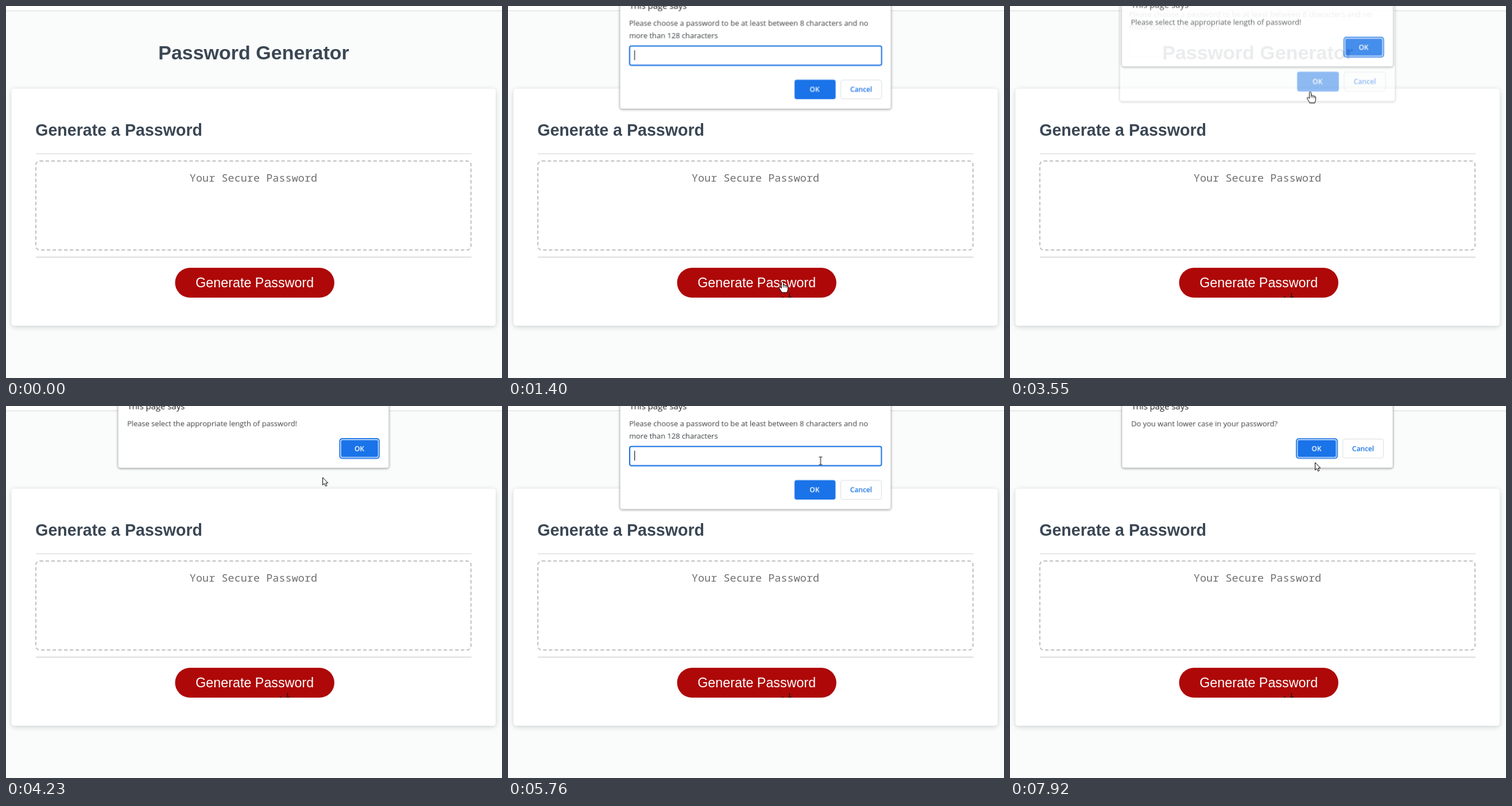
Animation, 864 px wide and 648 px high, one loop 8 s. Source, as an HTML page:

```html
<!DOCTYPE html>
<html lang="en">
<head>
<meta charset="utf-8">
<title>Password Generator</title>
<style>
html, body { margin: 0; width: 100%; height: 100%; overflow: hidden; background: #fafcfb; }
svg, .area { position: absolute; box-sizing: border-box; }
svg { left: 0; top: 0; width: 864px; height: 648px; }
.area { left: 51px; top: 269px; width: 760px; height: 157px; border: 2px dashed #c0c0c0; border-radius: 8px; }

.page { font-family: "Liberation Sans", Arial, sans-serif; }
.dark { fill: #3b4754; font-weight: bold; }
.mid { text-anchor: middle; }
.mono { font: 18.55px "Noto Sans Mono", monospace; fill: #707070; }
.card { fill: #fff; filter: drop-shadow(0 2px 4px rgba(60, 72, 84, .24)); }

.dialog { font: 12.92px "Open Sans", sans-serif; fill: #3c4043; transform-origin: 431px 31px; }
.panel { fill: #fff; stroke: rgba(0, 0, 0, .16); filter: drop-shadow(0 1.5px 2px rgba(0, 0, 0, .36)); }
.title { font-size: 14.9px; fill: #202124; }
.label { font-size: 12px; font-weight: 600; text-anchor: middle; }
.blue { fill: #1a73e8; }
.white { fill: #fff; }
.field { fill: none; stroke: #dadce0; }
.ring { fill: none; stroke: #1a73e8; stroke-width: 2; }
.gap { fill: none; stroke: #fff; stroke-width: 1.2; }
.shape { fill: #fff; stroke: #000; stroke-width: 1; stroke-linejoin: round; }

/* every animation shares the 8 s loop: 1% = 80 ms */
.dialog, .cursor, .cursor g, .caret, .fade, .key, .trace { animation: 8s linear infinite; }
.caret, .cursor g, .key, .trace { animation-timing-function: step-end; }
:root {
  --away: translateY(-17.5px) scale(1.0175);
  --home: translateY(0) scale(1);
  --enter: cubic-bezier(.33, .38, .7, .95);
  --leave: cubic-bezier(.33, .56, .68, 1);
}

#ask1 { animation-name: ask1; }
@keyframes ask1 {
  0%, 15.875% { opacity: 0; }
  17.44%, 43.19% { opacity: 1; }
  45.5%, 100% { opacity: 0; }
  0%, 15.875% { transform: var(--away); animation-timing-function: var(--enter); }
  18.125% { transform: var(--home); }
  42.875% { transform: var(--home); animation-timing-function: var(--leave); }
  45.125%, 100% { transform: var(--away); }
}
#warn { animation-name: warn; }
@keyframes warn {
  0%, 43.125% { opacity: 0; }
  44.69%, 58.94% { opacity: 1; }
  61.25%, 100% { opacity: 0; }
  0%, 43.125% { transform: var(--away); animation-timing-function: var(--enter); }
  45.375% { transform: var(--home); }
  58.625% { transform: var(--home); animation-timing-function: var(--leave); }
  60.875%, 100% { transform: var(--away); }
}
#ask2 { animation-name: ask2; }
@keyframes ask2 {
  0%, 58.875% { opacity: 0; }
  60.44%, 89.75% { opacity: 1; }
  92%, 100% { opacity: 0; }
  0%, 58.875% { transform: var(--away); animation-timing-function: var(--enter); }
  61.125% { transform: var(--home); }
  89.375% { transform: var(--home); animation-timing-function: var(--leave); }
  91.625%, 100% { transform: var(--away); }
}
#lower { animation-name: lower; }
@keyframes lower {
  0%, 89.625% { opacity: 0; }
  91.19%, 100% { opacity: 1; }
  0%, 89.625% { transform: var(--away); animation-timing-function: var(--enter); }
  91.875%, 100% { transform: var(--home); }
}

/* focus outlines fade once a button is pressed */
.blur1 { animation-name: blur1; }
@keyframes blur1 { 0%, 39.625% { opacity: 1; } 41%, 100% { opacity: 0; } }
.blur2 { animation-name: blur2; }
@keyframes blur2 { 0%, 56.375% { opacity: 1; } 57.75%, 100% { opacity: 0; } }
.blur3 { animation-name: blur3; }
@keyframes blur3 { 0%, 87.375% { opacity: 1; } 88.75%, 100% { opacity: 0; } }

.caret { fill: #222; }
.blink1 { animation-name: blink1; }
@keyframes blink1 {
  0%, 30% { opacity: 1; }
  23.75%, 36.25%, 100% { opacity: 0; }
}
.blink2 { animation-name: blink2; }
@keyframes blink2 {
  0% { opacity: 1; transform: none; }
  65.75% { opacity: 0; }
  72% { opacity: 1; transform: none; }
  74.625% { transform: translateX(7px); }
  76.375% { transform: translateX(14px); }
  82.625%, 100% { opacity: 0; transform: translateX(14px); }
}
.key1 { animation-name: key1; }
@keyframes key1 { 0% { opacity: 0; } 74.625%, 100% { opacity: 1; } }
.key2 { animation-name: key2; }
@keyframes key2 { 0% { opacity: 0; } 76.375%, 100% { opacity: 1; } }

.cursor { animation-name: travel; }
@keyframes travel {
  0%, 4.375% { transform: translate(806px, 648px); animation-timing-function: ease-in; }
  7.5% { transform: translate(640px, 566px); }
  10% { transform: translate(525px, 506px); }
  11.5% { transform: translate(484px, 488px); animation-timing-function: ease-out; }
  12.75% { transform: translate(470px, 468px); animation-timing-function: ease-in-out; }
  14%, 20.5% { transform: translate(478px, 480px); animation-timing-function: ease-in-out; }
  30.375% { transform: translate(533px, 142px); }
  31.625%, 39.625% { transform: translate(532px, 143px); animation-timing-function: ease-in-out; }
  43.75%, 50.625% { transform: translate(523px, 149.5px); animation-timing-function: ease-in-out; }
  56% { transform: translate(600px, 80px); }
  57.5%, 64.125% { transform: translate(599.5px, 85px); animation-timing-function: ease-in-out; }
  69.25%, 76.875% { transform: translate(544.5px, 95.5px); animation-timing-function: ease-in-out; }
  83.75% { transform: translate(531px, 163px); animation-timing-function: ease-in-out; }
  86.375%, 87.375% { transform: translate(529px, 160px); }
  89.375%, 96.875% { transform: translate(527px, 155.5px); animation-timing-function: ease-in-out; }
  99%, 100% { transform: translate(531px, 98px); }
}
.cursor .arrow { animation-name: arrow; }
@keyframes arrow {
  0%, 10%, 28.75%, 54.125%, 80.375% { opacity: 0; }
  4.375%, 22%, 50.75%, 78.5%, 97%, 100% { opacity: 1; }
}
.cursor .hand { animation-name: hand; }
@keyframes hand {
  0%, 22%, 50.75%, 58.75%, 97%, 100% { opacity: 0; }
  10%, 28.75%, 54.125%, 80.375% { opacity: 1; }
}
.cursor .beam { animation-name: beam; }
@keyframes beam {
  0%, 78.5%, 100% { opacity: 0; }
  58.75% { opacity: 1; }
}
.trace { animation-name: trace; }
@keyframes trace { 0% { opacity: 0; } 11.75%, 100% { opacity: 1; } }
</style>
</head>
<body>
<svg viewBox="0 0 864 648" class="page">
  <rect width="864" height="8" fill="#fff"/>
  <rect y="7.5" width="864" height="1.6" fill="#e1e3e3"/>
  <text class="dark mid" x="431.5" y="93" font-size="34">Password Generator</text>
  <rect class="card" x="9.5" y="144" width="843.5" height="413" rx="5"/>
  <text class="dark" x="51.2" y="226" font-size="28.6">Generate a Password</text>
  <path d="M52 257.4H811" stroke="#e2e3e4" stroke-width="1.8"/>
  <path d="M52 437.5H811" stroke="#e2e2e3" stroke-width="2.4"/>
  <text class="mono mid" x="431" y="305.5">Your Secure Password</text>
  <rect x="294.5" y="456" width="277.5" height="52" rx="26" fill="#ae0808"/>
  <text class="white mid" x="433.2" y="489.5" font-size="23.3">Generate Password</text>
</svg>
<div class="area"></div>

<svg viewBox="0 0 864 648">
  <defs>
    <g id="prompt">
      <rect class="panel" x="195" y="-60" width="472" height="240" rx="4"/>
      <text class="title" x="211.5" y="5.5">This page says</text>
      <text x="211" y="35.5">Please choose a password to be at least between 8 characters and no</text>
      <text x="211" y="56.5">more than 128 characters</text>
      <rect class="field" x="211.5" y="70.5" width="439" height="33" rx="3"/>
      <use href="#pair" y="72"/>
    </g>
    <g id="pair">
      <rect class="blue" x="499" y="57" width="71.5" height="34" rx="4"/>
      <text class="label white" x="534" y="78.4">OK</text>
      <rect class="field" x="579.5" y="57.5" width="71" height="33" rx="4"/>
      <text class="label blue" x="615" y="78.4">Cancel</text>
    </g>
    <g id="short">
      <rect class="panel" x="195" y="-60" width="472" height="168" rx="4"/>
      <text class="title" x="211.5" y="5.5">This page says</text>
    </g>
    <rect id="focus" class="ring" x="212" y="70.5" width="438.5" height="33.5" rx="3"/>
    <rect id="bar" x="220" y="78" width="1.2" height="17"/>
  </defs>

  <path class="trace" d="M490.5 500v6M488 507h6M477 507.3h3" fill="none" stroke="#2b0505" stroke-width="1.4"/>

  <g id="ask1" class="dialog">
    <use href="#prompt"/>
    <use href="#focus" class="fade blur1"/>
    <use href="#bar" class="caret blink1"/>
  </g>

  <g id="warn" class="dialog">
    <use href="#short"/>
    <text x="211" y="35.5">Please select the appropriate length of password!</text>
    <rect class="blue" x="581.5" y="57" width="68.5" height="34" rx="4"/>
    <g class="fade blur2">
      <rect class="ring" x="581.5" y="57" width="68.5" height="34" rx="4"/>
      <rect class="gap" x="583" y="58.5" width="65.5" height="31" rx="3"/>
    </g>
    <text class="label white" x="615.5" y="78.4">OK</text>
  </g>

  <g id="ask2" class="dialog">
    <use href="#prompt"/>
    <use href="#focus" class="fade blur3"/>
    <text class="key key1" x="219.3" y="91.5">2</text>
    <text class="key key2" x="226.4" y="91.5">2</text>
    <use href="#bar" class="caret blink2"/>
  </g>

  <g id="lower" class="dialog">
    <use href="#short"/>
    <text x="211" y="35.5">Do you want lower case in your password?</text>
    <use href="#pair"/>
    <rect class="ring" x="499" y="57.2" width="71" height="33.8" rx="4"/>
    <rect class="gap" x="500.6" y="58.7" width="67.8" height="30.8" rx="3"/>
  </g>

  <g class="cursor">
    <g class="arrow"><path class="shape" d="M.5.5V13.6L3.5 10.8 5.6 15.6 7.8 14.6 5.8 10H9.8Z"/></g>
    <g class="hand">
      <path class="shape" d="M-1.6 1.4C-1.6-.4 1.6-.4 1.6 1.4V6.5C2.4 5.6 4.4 5.9 4.6 7.2 5.6 6.5 7.2 6.9 7.4 8.1 8.6 7.5 9.6 8.3 9.6 9.6V13.5C9.6 15.5 8.4 16.5 8.2 19H-1.2C-1.4 17-5.6 12.6-5.6 10.8-5.4 9.2-3.2 9.4-1.6 11.6Z"/>
      <path d="M1.6 6.5v3.8M4.6 7.2v3.3M7.4 8.1v2.8" stroke="#000" stroke-width=".9"/>
    </g>
    <g class="beam"><path d="M-3-6.8h2.2l.8.8.8-.8H3M0-6V6M-3 6.8h2.2l.8-.8.8.8H3" fill="none" stroke="#111" stroke-width="1.1"/></g>
  </g>
</svg>
</body>
</html>
```
